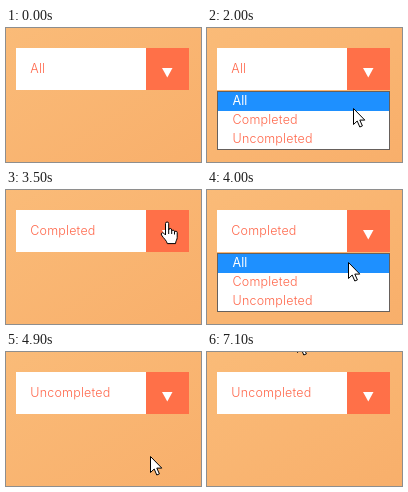
Recreate the animation shown at these times as an HTML page. Size 195 by 134 pixels, loop 7.5 s.

```html
<!DOCTYPE html>
<html lang="en">
<head>
<meta charset="utf-8">
<title>Select menu</title>
<style>
html, body { margin: 0; width: 100%; height: 100%; overflow: hidden; }
svg { display: block; width: 100vw; height: 100vh; }
text { font: 300 12.5px Inter, "Open Sans", sans-serif; letter-spacing: .2px; fill: #ff674b; }
.row.on rect { fill: #1e90ff; }
.row.on text { fill: #fff; font-weight: 400; letter-spacing: .1px; }
.pointer { fill: #fff; stroke: #000; stroke-linejoin: round; }
</style>
</head>
<body>
<svg viewBox="0 0 195 134">
  <defs>
    <linearGradient id="bg" x1="0" y1="0" x2="1" y2="1">
      <stop offset="0" stop-color="#fabb78"/>
      <stop offset="1" stop-color="#f8af6b"/>
    </linearGradient>
  </defs>
  <rect width="195" height="134" fill="url(#bg)"/>
  <rect x="10" y="20" width="130" height="42" fill="#fff"/>
  <rect x="140" y="20" width="43" height="42" fill="#ff7048"/>
  <path d="M156 40h10.5l-5.2 9.5z" fill="#fff"/>
  <text id="value" x="24.3" y="45"></text>
  <g id="menu">
    <rect x="10.5" y="63.5" width="172" height="58" fill="#fff" stroke="#66605c"/>
    <g id="rows"></g>
  </g>
  <g id="status">
    <path d="M0 130h93v4H0z" fill="#fbe2c8"/>
    <path d="M0 129.5h93.5V134" fill="none" stroke="#a2744b"/>
  </g>
  <g id="cursor" class="pointer">
    <path id="arrow" d="M.5 .5v16l3.7-3.5 2.6 6 2.6-1.1-2.6-5.8h5z"/>
    <g id="hand" transform="translate(-7 -1)">
      <path d="M5.5 14V2.6a1.6 1.6 0 0 1 3.2 0V9a1.5 1.5 0 0 1 3 0v1a1.5 1.5 0 0 1 2.8 .3v.8a1.4 1.4 0 0 1 2.7 .3v5.2c0 2-1.4 3-1.7 6H7.3c-.6-3-3.5-5-5.8-8.6-.9-1.6 .8-2.9 2.2-1.8z"/>
      <path d="M8.7 9v4M11.7 10v3M14.5 11v2.5" fill="none"/>
    </g>
  </g>
</svg>
<script>
const LOOP = 7500, TICK = 100;
const labels = ["All", "Completed", "Uncompleted"];
const $ = id => document.getElementById(id);
const show = (id, on) => $(id).style.display = on ? "" : "none";
const within = (t, a, b) => t >= a && t < b;

// first tick, last tick, start point, end point, ease-out power for x and y
const moves = [
  [1000, 1200, 194, 47, 159, 44, 1, 1],
  [1700, 2200, 159, 44, 142, 86, 1.3, 1.8],
  [2800, 3500, 142, 86, 161, 32, 1.4, 1.4],
  [3900, 4300, 161, 32, 122, 110, 1.4, 1.4],
  [4900, 4900, 122, 110, 144, 104, 1, 1],
  [6500, 7100, 131, 42, 90, -16, 1, 1]
];

$("rows").innerHTML = labels.map((label, i) =>
  `<g class="row"><rect x="11" y="${64 + 19 * i}" width="171" height="19" fill="#fff"/>` +
  `<text x="25.5" y="${77 + 19 * i}">${label}</text></g>`).join("");
const rows = [...$("rows").children];

function tipAt(t) {
  const move = moves.filter(m => t >= m[0]).pop() || moves[0];
  const [a, b, x0, y0, x1, y1, px, py] = move;
  const k = Math.max(0, Math.min(1, (t - a + TICK) / (b - a + TICK)));
  const ease = p => 1 - (1 - k) ** p;
  return [x0 + (x1 - x0) * ease(px), y0 + (y1 - y0) * ease(py)].map(Math.round);
}

function draw(time) {
  const t = Math.floor(time % LOOP / TICK) * TICK;
  const [x, y] = tipAt(t);
  const chosen = t < 2600 ? 0 : t < 4700 ? 1 : 2;
  const hovered = y < 64 ? chosen : Math.min(2, Math.floor((y - 64) / 19));
  const onSelect = y >= 20 && y < 62;

  $("value").textContent = labels[chosen];
  show("menu", within(t, 1400, 2600) || within(t, 3600, 4700));
  rows.forEach((row, i) => row.classList.toggle("on", i === hovered));
  show("status", within(t, 6000, 6100));
  show("cursor", within(t, 1000, 5000) || t >= 6500);
  show("hand", onSelect);
  show("arrow", !onSelect);
  $("cursor").setAttribute("transform", `translate(${x} ${y})`);
}

const start = performance.now();
function tick() {
  draw(performance.now() - start);
  requestAnimationFrame(tick);
}
tick();
</script>
</body>
</html>
```
